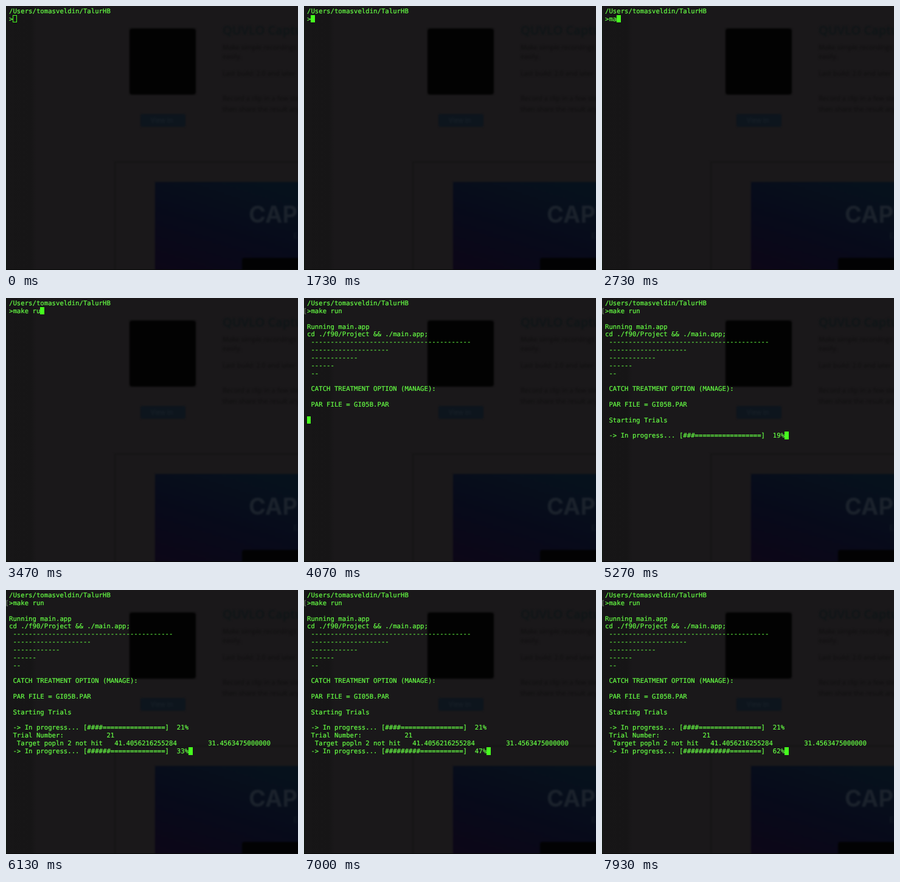
Recreate the animation shown at these times as an HTML page. Size 480x435 px, loop 8000 ms.

```html
<!DOCTYPE html>
<html lang="en">
<head>
<meta charset="utf-8">
<title>Terminal run</title>
<style>
  html, body { margin: 0; width: 100%; height: 100%; overflow: hidden; background: #1a181a; }
  #stage { position: relative; width: 480px; height: 435px; overflow: hidden; background: #1a181a; }
  #stage > * { position: absolute; }
  #page { left: 0; top: 0; }
  #term, #mark {
    margin: 0; white-space: pre; color: #66ff44;
    font: 10.667px/12.85px "DejaVu Sans Mono", monospace;
    text-rendering: geometricPrecision; font-variant-ligatures: none;
    -webkit-text-stroke: 0.2px;
  }
  #term { left: 5px; top: 3px; }
  #mark { left: -1.4px; top: 15.85px; color: #6f7d6a; }
  #cursor { width: 6.4px; height: 12.6px; box-sizing: border-box; background: #46ff1e; }
  #cursor.hollow { background: none; border: 1px solid #46ff1e; }
</style>
</head>
<body>
<div id="stage">
  <svg id="page" width="480" height="435">
    <defs>
      <linearGradient id="banner" x1="0.7" y1="0" x2="0.2" y2="1">
        <stop offset="0" stop-color="#06111c"/>
        <stop offset="0.5" stop-color="#070a1a"/>
        <stop offset="1" stop-color="#0c0617"/>
      </linearGradient>
      <linearGradient id="strip">
        <stop offset="0" stop-color="#171617"/>
        <stop offset="0.8" stop-color="#161516"/>
        <stop offset="1" stop-color="#1a181a"/>
      </linearGradient>
      <filter id="soft" x="-10%" y="-10%" width="120%" height="120%" color-interpolation-filters="sRGB">
        <feGaussianBlur stdDeviation="1.8"/>
      </filter>
    </defs>
    <rect width="50" height="435" fill="url(#strip)"/>
    <g filter="url(#soft)" font-family="Open Sans, sans-serif" font-size="11" fill="#0f0e0f">
      <path d="M179 440V257H490" fill="none" stroke="#151415" stroke-width="2"/>
      <rect x="203" y="37" width="109" height="109" rx="4" fill="#020202"/>
      <rect x="221" y="178" width="74" height="21" rx="3" fill="#0d151d"/>
      <text x="238" y="192" fill="#1b232b">View in</text>
      <text x="356" y="47" font-size="20" font-weight="600" fill="#0e1517">QUVLO Capture</text>
      <text x="356" y="72">Make simple recordings</text>
      <text x="356" y="87">easily.</text>
      <text x="356" y="115">Last build: 2.0 and later</text>
      <text x="356" y="156">Record a clip in a few steps</text>
      <text x="356" y="174">then share the result anywhere</text>
      <rect x="245" y="290" width="250" height="160" fill="url(#banner)"/>
      <rect x="388" y="415" width="110" height="40" rx="4" fill="#020203"/>
      <text x="399" y="357" font-family="Inter, sans-serif" font-size="38" font-weight="700" fill="#1b222c">CAPTURE</text>
      <text x="472" y="383" font-size="13" fill="#151d28">Easy</text>
    </g>
    <path d="M0.5 0V435" stroke="#0f190e"/>
    <path d="M0 434.5H480" stroke="#080908"/>
  </svg>
  <div id="cursor"></div>
  <pre id="term"></pre>
  <div id="mark">[</div>
</div>
<script>
const LOOP = 8000, STEP = 200 / 3, CELL = 6.422, ROW = 12.85;
const FOCUS = 1240, ENTER = 3860, LAUNCH = 3920, REPORT = 3990, TRIALS = 4120;
const COMMAND = 'make run';
const KEY_TIMES = [2320, 2530, 2790, 2930, 3060, 3320, 3460, 3590];
const STALL = 21;

const term = document.getElementById('term');
const cursor = document.getElementById('cursor');
const mark = document.getElementById('mark');

const report = [
  ...[41, 20, 12, 6, 2].map(n => ' ' + '-'.repeat(n)),
  '', ' CATCH TREATMENT OPTION (MANAGE):', '', ' PAR FILE = GI05B.PAR', ''
];

function progress(percent) {
  const done = Math.floor(percent / 5);
  const bar = '#'.repeat(done) + '='.repeat(20 - done);
  return ` -> In progress... [${bar}] ${String(percent).padStart(3)}%`;
}

function screen(t) {
  const typed = KEY_TIMES.filter(k => t >= k).length;
  const lines = ['/Users/tomasveldin/TalurHB', '>' + COMMAND.slice(0, typed)];
  if (t >= ENTER) lines.push('');
  if (t >= LAUNCH) lines.push('Running main.app', 'cd ./f90/Project && ./main.app;');
  if (t >= REPORT) lines.push(...report);
  if (t < TRIALS) return t >= LAUNCH ? [...lines, ''] : lines;

  lines.push(' Starting Trials', '');
  const percent = Math.floor(19.4 + (t - 5270) * 0.0162);
  if (percent < 1) return [...lines, ''];
  lines.push(progress(Math.min(percent, STALL)));
  if (percent > STALL) {
    lines.push(
      ' Trial Number:' + ' '.repeat(11) + STALL,
      '  Target popln 2 not hit   41.4056216255284' + ' '.repeat(8) + '31.4563475000000',
      progress(percent)
    );
  }
  return lines;
}

function draw(now) {
  // The small lead absorbs rounding at step boundaries.
  const t = Math.floor((now % LOOP + 5) / STEP) * STEP;
  const lines = screen(t);
  const last = lines.length - 1;
  const text = lines.join('\n');
  if (term.textContent !== text) term.textContent = text;
  cursor.style.left = 5 + lines[last].length * CELL + 'px';
  cursor.style.top = 2 + last * ROW + 'px';
  cursor.className = t < FOCUS ? 'hollow' : '';
  mark.style.visibility = t >= ENTER ? 'visible' : 'hidden';
}

const start = performance.now();
function tick() {
  draw(performance.now() - start);
  requestAnimationFrame(tick);
}
tick();
</script>
</body>
</html>
```
